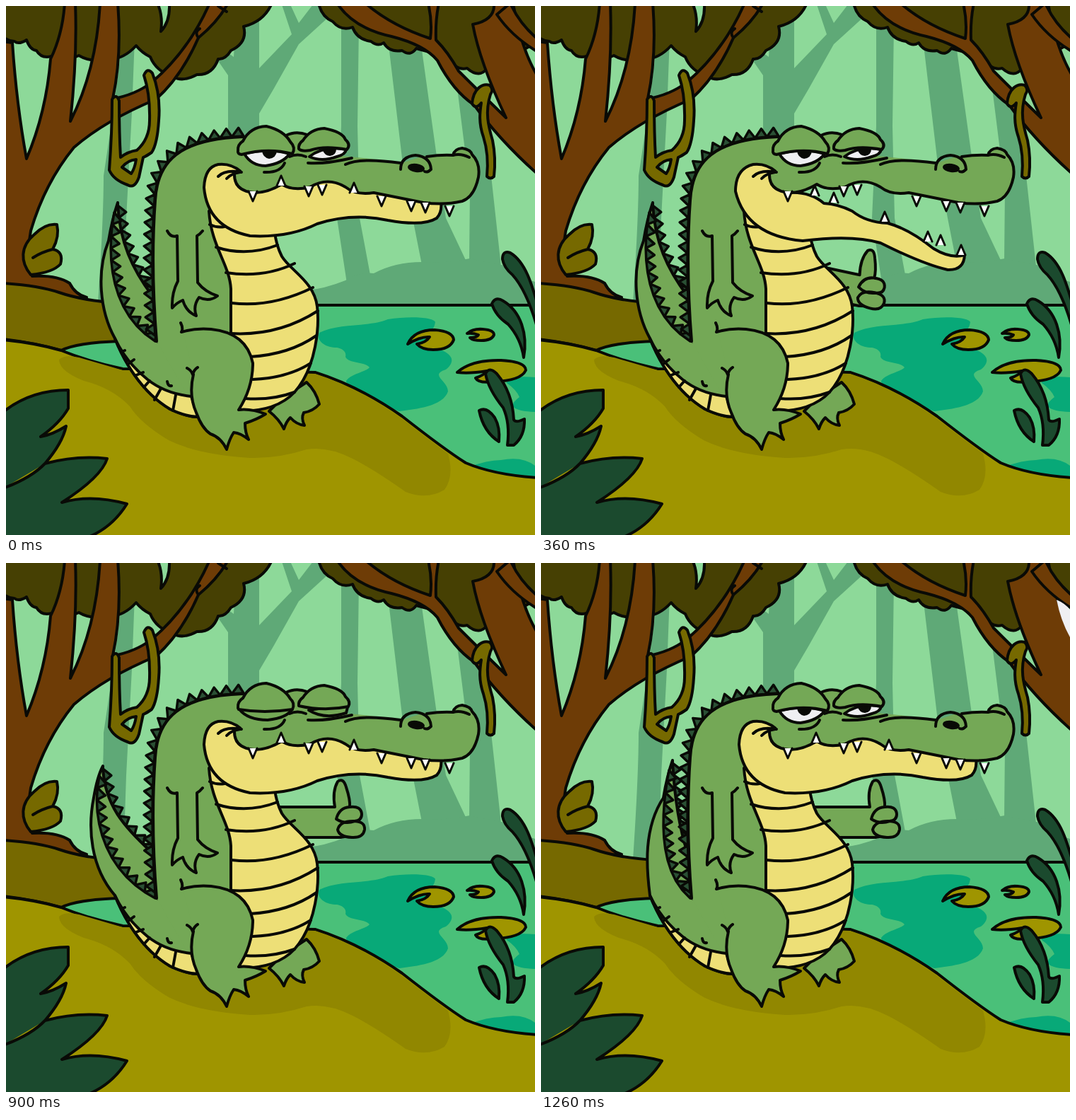
Write an HTML page that moves like this. It is 748 by 748 pixels and loops after 1440 ms.

```html
<!DOCTYPE html>
<html lang="en">
<head>
<meta charset="utf-8">
<title>Crocodile thumbs up</title>
<style>
html, body { margin: 0; height: 100%; overflow: hidden; background: #8dd999; }
svg { display: block; width: 100vw; height: 100vh; }
path, ellipse { stroke: #090a06; stroke-width: 4; stroke-linejoin: round; stroke-linecap: round; fill: none; }
.sky { fill: #8dd999; }
.far { fill: #5fa977; }
.bark { fill: #6e3c06; }
.canopy { fill: #464003; }
.moss { fill: #766900; }
.olive { fill: #9f9500; }
.shade { fill: #918700; }
.water { fill: #4ac079; }
.deep { fill: #08a978; }
.leaf { fill: #1b4a2e; }
.skin { fill: #74a856; }
.belly { fill: #eddf77; }
.spike { fill: #2a5034; stroke-width: 3.5; }
.tooth { fill: #fff; stroke-width: 3; }
.white { fill: #efeff2; }
.ink { fill: #090a06; }
.bare { stroke: none; }
</style>
</head>
<body>
<svg viewBox="0 0 748 748">
  <g id="forest">
    <path class="far bare" d="M165 45H182L178 150L170 300L166 420H130Q138 300 138 240Q152 150 165 45Z"/>
    <path class="far bare" d="M325 20H358V88L404 40L390-2H402L414 24L434-2H452L458 14L414 54L378 118L358 152V190H314V98L296 72L308 62L322 72Z"/>
    <path class="far bare" d="M474 25H499L497 170L500 300L515 380L482 392L468 300L474 170Z"/>
    <path class="far bare" d="M541 55H587L610 220L622 300L656 372L588 366L575 300L560 215Z"/>
    <path class="far bare" d="M636 100L676 130L686 240L700 368L655 362L656 260Z"/>
    <path class="far bare" d="M425 402Q450 400 480 388Q500 375 520 378Q550 362 588 362Q620 364 656 357Q680 362 700 366Q724 368 732 385L748 390V424H425Z"/>
  </g>

  <g id="trees">
    <path class="canopy" d="M-4-4H376Q365 22 336 29Q342 52 318 63Q310 76 300 75Q292 98 270 97Q250 108 236 100Q212 92 204 72Q192 66 184 56Q164 78 140 75Q120 80 103 70Q85 78 72 68Q52 78 43 63Q34 62 29 48Q18 55 12 50Q4 50-4 44Z"/>
    <path class="sky" d="M215-2Q222 15 219 36Q232 22 231-2Z"/>
    <path class="bark" d="M-4 50L9 52Q15 140 29 216Q57 150 63 75Q80 40 83-4H98Q101 70 91 163Q128 90 133-4H158Q164 70 151 131Q182 126 206 108Q258 64 288-4H314Q300 22 272 45Q248 100 212 132Q140 162 96 200Q55 250 35 318Q28 360 37 382Q72 380 90 392Q98 408 114 412L-4 418Z"/>
    <path d="M272 45Q266 37 274 32M300 0L312 8"/>
    <path class="canopy" d="M442-4Q446 15 462 22Q474 36 490 30Q496 47 516 50Q526 58 534 52Q542 66 560 63Q572 72 580 60L625 72Q636 92 652 88Q670 104 682 86L735 60L752 50V-4Z"/>
    <path class="bark" d="M468-4Q492 32 545 43Q592 55 610 77Q632 120 662 140Q698 190 752 238V100Q728 60 717-4H690Q692 20 660 26Q670 80 707 158Q672 124 640 92Q625 65 608 48Q607 20 612-4H597Q603 22 600 46Q545 28 508-4Z"/>
    <path class="bark" d="M713-4Q726 25 752 47V65Q715 43 694 12Z"/>
    <path class="white bare" id="glint" d="M729 52Q741 57 748 66V105Q735 82 729 52Z"/>
    <path class="moss" d="M35 380C20 362 20 340 40 323Q56 307 72 309Q76 326 66 344Q82 347 77 365Q66 377 35 380ZM66 344Q50 348 38 356"/>
    <path class="moss" fill-rule="evenodd" d="M150 132Q156 123 160 134Q160 180 162 214Q172 206 185 204Q203 188 203 162Q204 125 195 98Q200 86 207 95Q219 125 216 162Q214 195 206 207Q199 212 194 214L188 242Q182 259 172 253Q152 246 146 232Q150 180 150 132ZM164 228Q172 218 184 217Q182 230 177 237Z"/>
    <path class="moss" d="M659 138C661 116 674 109 684 112Q690 118 685 125C677 150 682 170 688 190Q693 215 690 241Q685 246 680 241Q683 210 675 185C668 165 670 150 672 137Q664 147 659 138Z"/>
  </g>

  <g id="pond">
    <path class="water" d="M-4 423H752V700H-4Z"/>
    <path class="deep bare" d="M443 462C470 448 515 454 540 443C570 438 605 440 607 447C605 464 587 462 602 482C640 492 632 506 622 514C598 522 625 530 625 545C618 566 580 570 556 573C520 560 480 540 481 530C488 520 508 518 514 511C506 502 484 506 480 496C482 488 474 484 468 483C450 483 438 472 443 462Z"/>
    <path class="deep bare" d="M748 525Q708 522 708 533Q722 543 726 553Q700 572 748 574ZM655 652Q680 642 700 642Q730 636 748 650V668Z"/>
    <path class="moss" d="M-4 392Q45 395 75 405Q110 417 160 420V474Q100 476 78 487Q40 476-4 471Z"/>
    <path class="olive" d="M568 478Q577 458 606 458Q632 460 633 472Q628 486 604 486Q588 486 581 478Q594 476 599 468Q586 467 568 478Z"/>
    <path class="olive" d="M652 463Q660 456 674 457Q690 458 690 465Q687 473 672 473Q660 473 656 469Q666 469 668 465Q660 462 652 463Z"/>
    <path class="olive" d="M638 518Q658 500 700 501Q735 503 735 515Q728 530 690 531Q668 534 664 526Q676 522 680 516Q656 520 638 518Z"/>
    <path class="leaf" d="M702 358Q702 345 713 349C735 362 744 395 754 430V465Q738 404 716 380Q704 370 702 358Z"/>
    <path class="leaf" d="M687 421Q692 410 703 417C728 432 738 464 732 497Q728 470 710 450Q692 438 687 421Z"/>
    <path class="leaf" d="M678 520Q683 509 694 520Q716 546 718 585Q721 590 733 584Q734 608 718 621H709Q713 590 703 568Q682 542 678 520Z"/>
    <path class="leaf" d="M669 572Q680 566 691 582Q699 596 697 616Q675 602 669 572Z"/>
  </g>

  <g id="ground">
    <path class="olive" d="M-4 472Q40 476 78 487Q115 502 165 513L437 518Q500 538 560 580Q620 627 650 646Q690 663 752 667V752H-4Z"/>
    <path class="shade bare" d="M75 500Q84 491 110 499L165 515L437 520Q495 538 558 582Q590 607 625 633Q634 665 620 684Q595 699 565 687Q520 655 490 640Q455 622 425 627Q385 640 345 639Q270 634 230 614Q190 590 175 566Q150 540 110 530Q75 516 75 500Z"/>
    <path class="leaf" d="M-4 574Q35 543 88 543V569Q76 590 49 609Q66 606 85 594Q80 618 55 647Q100 635 143 640Q135 666 79 702Q120 690 171 704Q150 738 114 752H-4ZM-4 682Q36 667 55 647"/>
  </g>

  <g id="croc">
    <g id="hand">
      <path class="skin" d="M-110-20H-20Q-24-42-16-56Q-8-62-4-48Q2-30 1-20L8-8L4 20L-12 23H-100Z"/>
      <path class="skin" d="M-18-3Q-14-19 1-20Q17-22 18-10Q18-1 8 0Q-6 5-18-3ZM-16 12Q-13 0 6 0Q23 0 22 12Q20 24 4 23Q-14 22-16 12Z"/>
    </g>
    <path class="skin" d="M372 573Q386 584 393 598Q396 588 402 582Q411 592 422 593Q417 583 421 575Q434 573 443 563Q438 544 425 532L390 555Z"/>
    <path class="spike" id="tailFar"/>
    <path class="skin" id="tail"/>
    <path class="spike" id="tailNear"/>
    <path class="spike" id="back"/>
    <path class="skin bare" d="M213 474C207 400 207 330 211 275C214 220 245 188 330 186L370 200V330L400 420L400 500L330 572L275 578L258 553Z"/>
    <path d="M213 474C207 400 207 330 211 275C214 220 245 188 335 185"/>
    <path class="belly" d="M154 470C166 500 190 545 232 570Q255 581 272 581L262 552Q225 548 200 528Q170 504 154 470Z"/>
    <path d="M163 489L168 487M173 506L181 500M184 522L194 518M195 539L203 530M210 557L219 541M236 572L240 550M228 531Q229 538 234 537"/>
    <path class="belly" d="M287 290C290 340 316 365 318 400V468L327 573Q382 574 408 546C440 510 443 450 440 425C436 390 402 374 390 354Q382 338 380 320Z"/>
    <path d="M288 309Q298 314 309 312M297 341Q340 355 384 338M311 377Q365 385 408 364M319 420Q375 427 434 398M318 463Q385 467 441 431M345 496Q400 493 439 466M349 528Q398 526 431 505M338 555Q375 558 408 546"/>
    <path class="skin" d="M247 448Q251 456 248 461Q268 455 290 457Q340 462 349 505Q349 540 329 571Q347 569 367 577Q354 585 338 590Q338 603 343 613Q332 604 322 603Q316 612 312 627Q304 610 289 605Q277 597 269 575Q258 550 265 521"/>
    <path d="M256 512Q262 515 264 521Q266 514 271 511"/>
    <path d="M228 318Q233 328 242 325L243 389Q234 406 235 427Q242 419 250 416Q255 433 269 438Q264 424 273 412Q287 419 299 410Q281 404 271 391L270 325Q274 323 278 318"/>
    <path class="belly" id="jaw"/>
    <path class="skin bare" d="M330 188L398 182Q410 176 424 183L475 212Q520 216 560 222L590 212L632 211Q634 203 645 201Q657 203 659 210Q670 222 668 242Q662 270 645 276Q620 282 590 278Q540 268 520 264Q495 268 480 256Q455 241 430 256Q405 262 390 252Q370 264 352 264Q326 262 323 237L333 233Z"/>
    <path d="M396 183Q410 176 426 182M480 224Q500 214 558 222M595 213Q615 210 632 211Q634 202 645 201Q657 203 659 210Q671 222 668 242Q662 270 645 276Q620 282 590 278Q540 268 520 264Q495 268 480 256Q455 241 430 256Q405 262 390 252Q370 264 352 264Q322 262 323 237M632 211Q643 208 655 214"/>
    <path d="M558 231Q558 213 579 211Q600 213 601 231Q596 236 592 234"/>
    <ellipse class="ink" cx="580" cy="229" rx="10" ry="4" transform="rotate(8 580 229)"/>
    <path d="M300 241Q310 231 333 235M312 244Q318 237 331 235M365 235Q388 236 394 222M401 213Q412 208 424 213M427 222Q450 224 489 215"/>
    <path class="tooth" id="lowTeeth"/>
    <path class="tooth" id="topTeeth"/>
    <g id="open">
      <path class="white" d="M337 209Q347 226 367 226Q391 223 401 209Q370 200 337 209Z"/>
      <path class="ink bare" d="M362 205H383Q382 215 372 216Q363 214 362 205Z"/>
      <path class="white" d="M429 213Q446 221 468 213Q480 210 481 203Q450 197 429 213Z"/>
      <path class="ink bare" d="M448 204L467 202Q467 211 458 212Q450 211 448 204Z"/>
    </g>
    <path class="skin" id="shut" d="M330 207Q342 222 370 222Q398 219 405 206L400 200ZM428 208Q450 222 481 212L484 200Z"/>
    <path class="skin" id="lids"/>
  </g>
</svg>
<script>
const $ = id => document.getElementById(id);
const setPath = (id, d) => $(id).setAttribute('d', d);
const show = (id, on) => $(id).style.display = on ? '' : 'none';

// Row of n triangles standing to the left of a curve
function spikes(curve, n, height) {
  const path = document.createElementNS('http://www.w3.org/2000/svg', 'path');
  path.setAttribute('d', curve);
  const length = path.getTotalLength();
  const at = k => path.getPointAtLength(length * k / n);
  let d = '';
  for (let i = 0; i < n; i++) {
    const a = at(i), b = at(i + 1), m = at(i + .6);
    const size = Math.hypot(b.x - a.x, b.y - a.y);
    const x = m.x + (b.y - a.y) / size * height;
    const y = m.y - (b.x - a.x) / size * height;
    d += `M${a.x} ${a.y}L${x} ${y}L${b.x} ${b.y}Z`;
  }
  return d;
}

// Open at the gum, so the lip line stays the only edge there
const teeth = (tips, height) => tips.map(([x, y]) =>
  `M${x - 6} ${y + height}L${x} ${y}L${x + 6} ${y + height}`).join('');

setPath('back', spikes('M211 466C206 400 206 330 210 275C213 220 245 187 336 184', 22, 12));
setPath('topTeeth', teeth([[349, 276], [428, 269], [447, 267], [531, 283], [573, 290], [593, 292], [627, 297]], -14));

const lids = {
  open: 'M328 205Q327 196 335 191Q345 171 368 170Q393 176 402 192Q410 200 405 209Q370 200 333 210Q327 209 328 205ZM414 202Q413 195 420 190Q430 174 450 173Q476 178 480 189Q488 196 482 203Q450 197 430 204Q418 206 414 202Z',
  shut: 'M328 205Q327 196 335 191Q345 171 368 170Q393 176 402 192Q409 198 405 207Q365 213 329 207ZM414 202Q413 195 420 190Q430 174 450 173Q476 178 480 189Q488 196 484 203Q450 210 414 202Z'
};

const jaws = [
  { d: 'M332 234Q318 222 300 224Q281 228 280 257Q285 313 345 325Q400 328 440 308Q490 292 540 303Q590 312 609 300Q617 292 615 276L520 250L455 235L400 245L350 255Q324 258 323 237Z',
    tips: [[389, 240], [492, 250]] },
  { d: 'M332 234Q318 222 300 224Q279 228 278 258Q290 325 350 328Q400 328 445 317Q500 322 545 331Q590 342 606 332Q616 322 611 310Q585 314 560 304Q525 284 490 284Q465 276 442 263Q420 270 400 263Q370 254 350 264Q324 258 323 237Z',
    tips: [[391, 247], [414, 257], [426, 255], [491, 271], [557, 289], [575, 290], [605, 297]] },
  { d: 'M332 234Q318 222 300 224Q275 230 275 262Q290 325 370 332Q440 323 480 335Q540 365 575 373Q598 374 599 352Q580 358 555 343Q520 315 490 307Q460 306 440 290Q420 280 400 279Q380 262 350 264Q324 258 323 237Z',
    tips: [[387, 254], [414, 264], [486, 291], [547, 319], [565, 324], [594, 338]] }
];
const hands = [null, 'translate(440 435) rotate(33)', 'translate(466 404) rotate(12)', 'translate(485 365)'];
const tailTips = { left: [-21, 9], middle: [0, 0], right: [28, 1] };

function drawTail([dx, dy]) {
  const x = 157 + dx, y = 278 + dy, bend = dx * .6;
  const inner = `M${x + 1} ${y + 4}C${x + 4} ${y + 55} ${178 + bend} 372 207 410`;
  setPath('tailFar', spikes(inner, 8, 11));
  setPath('tail', `${inner}L213 474L300 500L272 581Q255 581 232 570C190 545 166 500 154 470C${132 + bend} 430 ${128 + bend} 375 ${x - 12} 332Q${x - 7} 302 ${x + 1} ${y}Z`);
  setPath('tailNear', spikes(`M${x - 4} ${y + 14}C${x - 16} 355 ${148 + bend} 435 211 474`, 12, 12));
}

// Each pose holds for 180 ms
const poses = [
  { tail: 'middle', jaw: 0, hand: 0 },
  { tail: 'left', jaw: 1, hand: 1 },
  { tail: 'middle', jaw: 2, hand: 2 },
  { tail: 'right', jaw: 0, hand: 3 },
  { tail: 'middle', jaw: 0, hand: 3, blink: true },
  { tail: 'left', jaw: 0, hand: 3, blink: true },
  { tail: 'middle', jaw: 0, hand: 3 },
  { tail: 'right', jaw: 0, hand: 3, glint: true }
];

function draw({ tail, jaw, hand, blink, glint }) {
  drawTail(tailTips[tail]);
  setPath('jaw', jaws[jaw].d);
  setPath('lowTeeth', teeth(jaws[jaw].tips, 14));
  show('hand', hand);
  if (hand) $('hand').setAttribute('transform', hands[hand]);
  show('open', !blink);
  show('shut', blink);
  setPath('lids', blink ? lids.shut : lids.open);
  show('glint', glint);
}

let start, shown = -1;
function tick(now) {
  start ??= now;
  const step = Math.floor((now - start) / 180) % poses.length;
  if (step !== shown) draw(poses[shown = step]);
  requestAnimationFrame(tick);
}
draw(poses[0]);
requestAnimationFrame(tick);
</script>
</body>
</html>
```
